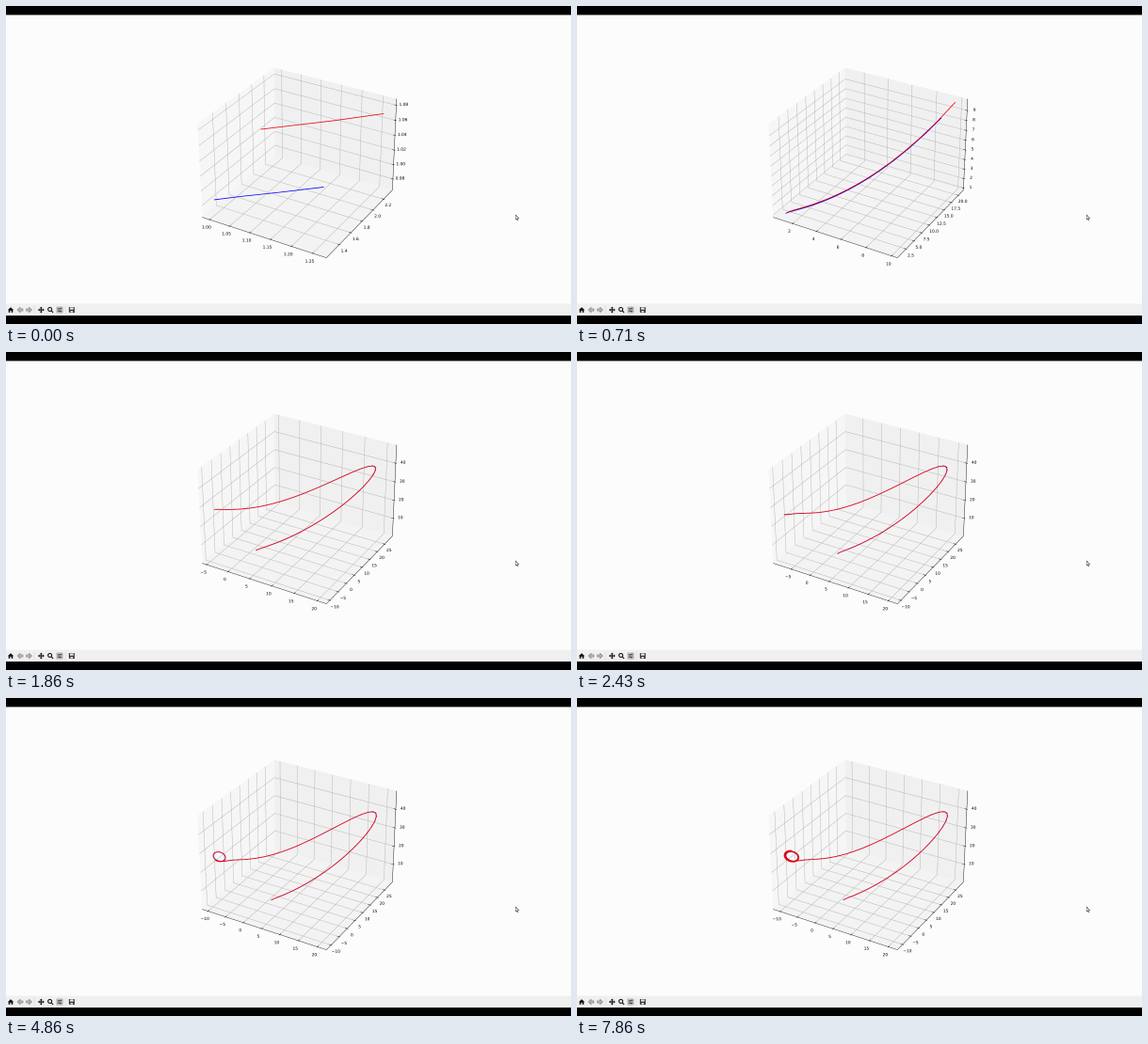
Animation, 600 px wide and 338 px high, one loop 8 s. Source, as an HTML page with a canvas:

```html
<!DOCTYPE html>
<html lang="en">
<head>
<meta charset="utf-8">
<title>Lorenz trajectories</title>
<style>
  html, body { margin: 0; width: 100%; height: 100%; overflow: hidden; background: #000; }
  canvas { display: block; width: 100%; height: 100%; }
</style>
</head>
<body>
<canvas id="stage" width="600" height="338"></canvas>
<script>
const W = 600, H = 338, LOOP = 8000, SCALE = 4;

function layer(scale) {
  const canvas = document.createElement('canvas');
  canvas.width = W * scale;
  canvas.height = H * scale;
  return canvas;
}

// Drawn large and halved twice, so that hairlines stay soft.
const big = layer(SCALE), half = layer(SCALE / 2);
const stage = document.getElementById('stage');
const ctx = big.getContext('2d');
const halfCtx = half.getContext('2d');
const stageCtx = stage.getContext('2d');
ctx.scale(SCALE, SCALE);
ctx.lineJoin = 'round';

// ---- Lorenz system, each coordinate updated in place ----
function lorenz(start, count) {
  let x = start, y = start, z = start;
  const dt = 0.01, points = [];
  for (let i = 0; i < count; i++) {
    x += dt * 10 * (y - x);
    y += dt * (x * (28 - z) - y);
    z += dt * (x * y - 8 / 3 * z);
    points.push([x, y, z]);
  }
  return points;
}
const blue = lorenz(1, 240), red = lorenz(1.1, 240);

// ---- Perspective view: azimuth -60, elevation 30 ----
const VIEW = [1.1429, 1.1429, 0.8571];
const EDGE = VIEW.map(v => v / 2 * 25 / 24);
const MARGIN = [0.05, 0.05, 0];

function project([x, y, z]) {
  const k = 1270 / (10 - (0.433 * x - 0.75 * y + 0.5 * z));
  return [311.2 + k * (0.866 * x + 0.5 * y),
          161.8 - k * (-0.25 * x + 0.433 * y + 0.866 * z)];
}

function tracePath(points) {
  ctx.beginPath();
  for (const p of points) ctx.lineTo(...project(p));
}

function line(points, color, width) {
  tracePath(points);
  ctx.strokeStyle = color;
  ctx.lineWidth = width;
  ctx.stroke();
}

function pane(points, color) {
  tracePath(points);
  ctx.fillStyle = color;
  ctx.fill();
}

function limits(points, axis) {
  const values = points.map(p => p[axis]);
  const min = Math.min(...values), max = Math.max(...values);
  const pad = (max - min) * MARGIN[axis];
  return [min - pad, max + pad];
}

function ticks([lo, hi]) {
  const raw = (hi - lo) / 9;
  const exp = Math.floor(Math.log10(raw));
  const lead = [1, 2, 2.5, 5, 10].find(s => s * 10 ** exp >= raw);
  const step = lead * 10 ** exp;
  const digits = Math.max(0, (lead === 2.5) - (lead === 10) - exp);
  const list = [];
  for (let i = Math.ceil(lo / step); i <= Math.floor(hi / step); i++) {
    const label = (i * step).toFixed(digits).replace('-', '\u2212');
    list.push({ value: i * step, label });
  }
  return list;
}

const [ex, ey, ez] = EDGE;
// Per axis: grid line, tick mark and label anchor at position p.
const AXES = [
  {
    ends: [[-ex, -ey, -ez], [ex, -ey, -ez]],
    grid: p => [[p, -ey, -ez], [p, ey, -ez], [p, ey, ez]],
    tick: p => [[p, -ey + 0.019, -ez], [p, -ey - 0.0095, -ez]],
    label: p => [p, -ey - 0.05, -ez - 0.045]
  },
  {
    ends: [[ex, -ey, -ez], [ex, ey, -ez]],
    grid: p => [[ex, p, -ez], [-ex, p, -ez], [-ex, p, ez]],
    tick: p => [[ex - 0.019, p, -ez], [ex + 0.0095, p, -ez]],
    label: p => [ex + 0.045, p, -ez - 0.045]
  },
  {
    ends: [[ex, ey, -ez], [ex, ey, ez]],
    grid: p => [[-ex, -ey, p], [-ex, ey, p], [ex, ey, p]],
    tick: p => [[ex - 0.019, ey, p], [ex + 0.0095, ey, p]],
    label: p => [ex + 0.046, ey + 0.046, p]
  }
];

function drawPlot(count) {
  const trails = [blue.slice(0, count), red.slice(0, count)];
  const all = trails.flat();
  const bounds = [0, 1, 2].map(axis => limits(all, axis));
  const place = (value, axis) => {
    const [lo, hi] = bounds[axis];
    return ((value - lo) / (hi - lo) - 0.5) * VIEW[axis];
  };

  pane([[-ex, -ey, -ez], [-ex, ey, -ez], [-ex, ey, ez], [-ex, -ey, ez]], '#f6f6f7');
  pane([[-ex, ey, -ez], [ex, ey, -ez], [ex, ey, ez], [-ex, ey, ez]], '#f0f0f1');
  pane([[-ex, -ey, -ez], [ex, -ey, -ez], [ex, ey, -ez], [-ex, ey, -ez]], '#f3f3f4');

  const marks = AXES.map((axis, i) => ticks(bounds[i]).map(t => ({ label: t.label, at: place(t.value, i) })));
  AXES.forEach((axis, i) => marks[i].forEach(m => line(axis.grid(m.at), '#b0b0b0', 0.42)));

  ctx.font = '4.35px "DejaVu Sans", sans-serif';
  ctx.textAlign = 'center';
  ctx.textBaseline = 'alphabetic';
  AXES.forEach((axis, i) => {
    line(axis.ends, '#000', 0.42);
    for (const m of marks[i]) {
      line(axis.tick(m.at), '#000', 0.42);
      const [x, y] = project(axis.label(m.at));
      ctx.fillStyle = '#000';
      ctx.fillText(m.label, x, y + 1.6);
    }
  });

  trails.forEach((trail, i) => {
    const points = trail.map(p => p.map(place));
    line(points, i ? '#f00000' : '#0000f0', 0.78);
  });
}

// ---- Window around the plot ----
function shape(d, x, y, fill, stroke, width = 0.6) {
  const path = new Path2D(d);
  ctx.save();
  ctx.translate(x, y);
  if (fill) {
    ctx.fillStyle = fill;
    ctx.fill(path);
  }
  if (stroke) {
    ctx.strokeStyle = stroke;
    ctx.lineWidth = width;
    ctx.stroke(path);
  }
  ctx.restore();
}

function rect(color, x, y, w, h) {
  ctx.fillStyle = color;
  ctx.fillRect(x, y, w, h);
}

function drawWindow() {
  const arrow = 'M-3 0L0-2.8V-1.1H3V1.1H0V2.8Z';
  rect('#000', 0, 0, W, H);
  rect('#fdfcfd', 0, 9.5, W, 319.5);
  rect('#f0f0f0', 0, 316.5, W, 12.5);
  for (const x of [29.8, 62.8]) rect('#d4d4d4', x, 318.5, 0.5, 9);

  shape('M-3.2 .2L0-2.8L3.2 .2H2.3V2.8H.7V.8H-.7V2.8H-2.3V.2Z', 5, 323, '#111');
  shape(arrow, 15, 323, '#b5b5b5', '#777', 0.5);
  ctx.save();
  ctx.translate(24.5, 323);
  ctx.scale(-1, 1);
  shape(arrow, 0, 0, '#b5b5b5', '#777', 0.5);
  ctx.restore();
  shape('M-3 0H3M0-3V3', 37.3, 323, null, '#111', 1.1);
  shape('M0-3.4L1.5-1.8H-1.5ZM0 3.4L1.5 1.8H-1.5ZM-3.4 0L-1.8-1.5V1.5ZM3.4 0L1.8-1.5V1.5Z', 37.3, 323, '#111');
  shape('M1.4-.6A2 2 0 1 1-2.6-.6A2 2 0 1 1 1.4-.6M.9 .9L2.9 2.9', 47.2, 323, null, '#111', 1.1);
  shape('M-3-3H3V3H-3Z', 57, 323, '#e4e4e4', '#777', 0.5);
  shape('M-2.3-1.7H2.3M-2.3 0H2.3M-2.3 1.7H2.3M1-2.5V-.9M-1-.8V.8M.7 .9V2.5', 57, 323, null, '#222', 0.65);
  shape('M-3-3H3V3H-2.2L-3 2.2Z', 69.8, 323, '#333');
  shape('M-1.9-2.6H1.9V-.3H-1.9ZM-1.4 1H1.3V2.7H-1.4Z', 69.8, 323, '#e6e6e6');
}

function drawCursor() {
  shape('M0 0V5L1.1 4L1.9 5.8L2.7 5.4L1.9 3.7H3.4Z', 541.2, 222, '#fff', '#333', 0.5);
}

function render(frame) {
  const stamp = Math.round(frame * 100 / 7) * 10;
  drawWindow();
  drawPlot(4 + Math.floor(stamp * 28 / 1000));
  drawCursor();
  halfCtx.drawImage(big, 0, 0, W * 2, H * 2);
  stageCtx.drawImage(half, 0, 0, W, H);
}

let shown = -1;
function tick(now) {
  const t = Math.floor((now - begin) % LOOP / 10) * 10;
  const frame = Math.max(0, Math.floor((t + 5) * 7 / 1000));
  if (frame !== shown) render(shown = frame);
  requestAnimationFrame(tick);
}
const begin = performance.now();
tick(begin);
</script>
</body>
</html>
```
